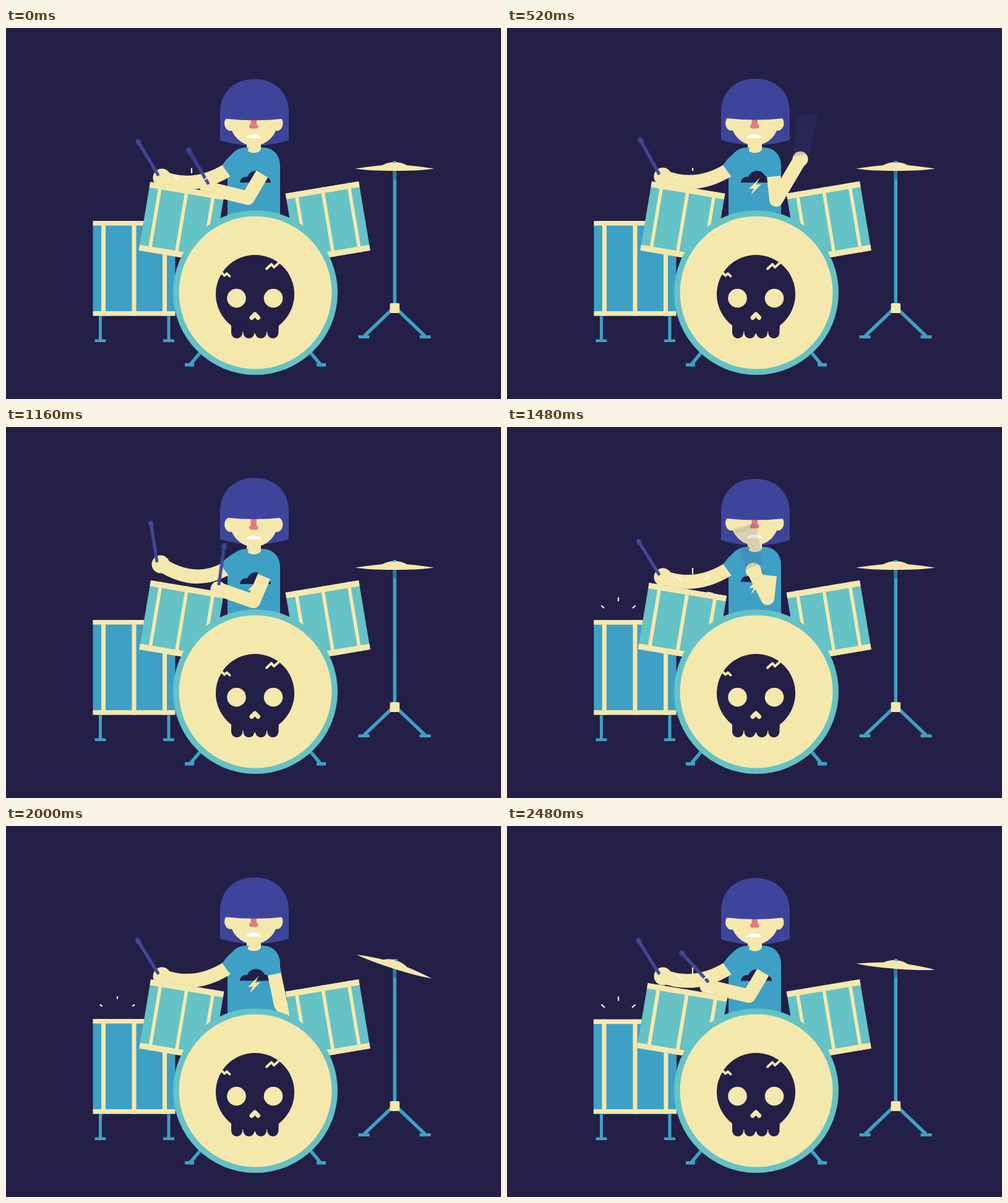
Write an HTML page with a canvas that moves like this. It is 800 px wide and 600 px high and loops after 2.52 s.

```html
<!DOCTYPE html>
<html lang="en">
<head>
<meta charset="utf-8">
<title>Drummer</title>
<style>
html, body { margin: 0; width: 100%; height: 100%; overflow: hidden; background: #231f47; }
canvas { display: block; width: 800px; height: 600px; }
</style>
</head>
<body>
<canvas id="stage" width="800" height="600"></canvas>
<script>
const NIGHT = '#231f47', CREAM = '#f5e8ac', BLUE = '#3ea0c5', TEAL = '#65c2c5';
const INDIGO = '#3d459b', PINK = '#e27a83', SHADE = '#2b7c9f', WHITE = '#ffffff';
const LOOP = 2520, BEAT = 504, FIRST_BEAT = 280;
const SHUTTER = 20, BLUR_STEPS = 8;

const stage = document.getElementById('stage').getContext('2d');
const layer = document.createElement('canvas');
layer.width = 800;
layer.height = 600;
const blur = layer.getContext('2d');
let c = stage;

const mod = (a, n) => ((a % n) + n) % n;
const rad = deg => deg * Math.PI / 180;

// Smooth looping curve through rows of [time, ...values].
function track(rows, time, period) {
  const n = rows.length;
  const row = i => {
    const r = rows[mod(i, n)].slice();
    r[0] += Math.floor(i / n) * period;
    return r;
  };
  const t = mod(time, period);
  let i = n - 1;
  while (i >= 0 && rows[i][0] > t) i--;
  const [a, b, d, e] = [row(i - 1), row(i), row(i + 1), row(i + 2)];
  const h = d[0] - b[0], u = (t - b[0]) / h;
  return b.slice(1).map((v, j) => {
    const k = j + 1, w = d[k];
    const m0 = (w - a[k]) / (d[0] - a[0]) * h;
    const m1 = (e[k] - v) / (e[0] - b[0]) * h;
    return v + u * (m0 + u * (3 * (w - v) - 2 * m0 - m1 + u * (2 * (v - w) + m0 + m1)));
  });
}

function linear(rows, t) {
  for (let i = 1; i < rows.length; i++) {
    const [t0, v0] = rows[i - 1], [t1, v1] = rows[i];
    if (t >= t0 && t < t1) return v0 + (v1 - v0) * (t - t0) / (t1 - t0);
  }
  return 0;
}

// phase, grip x, grip y, stick angle, sleeve x, sleeve y
const LEFT_ARM = [
  [0, 250, 282, -204, 360, 238],
  [8, 248, 278, -199, 359, 238],
  [40, 246, 257, -167, 355, 235],
  [110, 246, 243, -131, 356, 232],
  [184, 246, 239, -122, 356, 231],
  [224, 246, 238, -121, 356, 231],
  [376, 244, 218, -99, 353, 231],
  [420, 244, 216, -106, 353, 232],
  [455, 257, 258, -168, 357, 236],
  [480, 264, 288, -204, 360, 238]
];

// Right arm rows: time, elbow x, elbow y, grip x, grip y, stick angle.
const TOM_STROKE = [
  [-92, 398, 281, 340, 252, -88],
  [-32, 395, 280, 316, 284, -145],
  [0, 393, 280, 312, 288, -172],
  [88, 391, 277, 325, 255, -127]
];
const RIGHT_TOM_TRIP = [
  [520, 435, 278, 475, 205, -80],
  [600, 470, 266, 565, 215, -35],
  [650, 452, 284, 500, 285, 10],
  [700, 438, 290, 430, 318, -60],
  [760, 412, 286, 325, 310, -165]
];
const CYMBAL_TRIP = [
  [1540, 455, 274, 480, 190, -85],
  [1620, 483, 252, 548, 122, -72],
  [1690, 485, 256, 575, 190, -35],
  [1730, 470, 272, 545, 237, 0],
  [1800, 443, 288, 480, 335, 40],
  [2030, 443, 288, 470, 325, 20],
  [2160, 424, 287, 390, 315, -80],
  [2280, 396, 281, 312, 285, -142]
];
const LEFT_TOM_HITS = [312, 824, 1330, 2345];
const RIGHT_TOM_HITS = [640];
const CYMBAL_HITS = [1725];
const KICKS = [[276, 8], [810, 6], [1770, 8]];

const tomStroke = hit => TOM_STROKE.map(([t, ...pose]) => [hit + t, ...pose]);
const [firstHit, secondHit, thirdHit, lastHit] = LEFT_TOM_HITS;
const REST = [391, 275, 327, 252, -120], READY = [400, 282, 344, 255, -82];
const RIGHT_ARM = [
  [0, ...REST],
  ...tomStroke(firstHit),
  ...RIGHT_TOM_TRIP,
  ...tomStroke(secondHit).slice(2),
  [1000, ...REST],
  [1160, ...READY],
  ...tomStroke(thirdHit),
  ...CYMBAL_TRIP,
  ...tomStroke(lastHit).slice(2),
  [2480, 391, 275, 325, 252, -133]
];

const beatPhase = t => mod(t - FIRST_BEAT, BEAT);
const sinceHit = (t, hits) => Math.min(...hits.map(h => mod(t - h, LOOP)));
const squash = d => linear([[0, 0], [8, .38], [45, 1], [133, .62], [175, .08], [195, 0]], d);

function fill(color, build) {
  c.fillStyle = color;
  c.beginPath();
  build();
  c.fill();
}
function rect(color, x, y, w, h) {
  c.fillStyle = color;
  c.fillRect(x, y, w, h);
}
function disc(color, x, y, rx, ry = rx) {
  fill(color, () => c.ellipse(x, y, rx, ry, 0, 0, 7));
}
function poly(points) {
  points.forEach(([x, y], i) => i ? c.lineTo(x, y) : c.moveTo(x, y));
}
function stroke(color, width, points, cap = 'butt') {
  c.strokeStyle = color;
  c.lineWidth = width;
  c.lineCap = cap;
  c.lineJoin = 'round';
  c.beginPath();
  poly(points);
  c.stroke();
}
function at(x, y, draw) {
  c.save();
  c.translate(x, y);
  draw();
  c.restore();
}

function stands() {
  for (const x of [152.5, 263]) {
    rect(BLUE, x - 2.5, 450, 5, 55);
    rect(SHADE, x - 2.5, 450, 5, 17);
    rect(BLUE, x - 9, 503.5, 18, 4.5);
  }
  rect(BLUE, 625.5, 215, 5.5, 235);
  rect(SHADE, 625.5, 228, 5.5, 17);
  for (const side of [-1, 1]) {
    stroke(BLUE, 5.5, [[628 + side * 5, 456], [628 + side * 49, 498]]);
    rect(BLUE, 628 + side * 49.5 - 9, 497, 18, 5);
  }
  fill(CREAM, () => c.roundRect(620.5, 445, 15.5, 16, 2));
}

function torso(lift) {
  at(0, lift, () => {
    fill(BLUE, () => {
      c.moveTo(358, 340);
      c.lineTo(358, 228);
      c.bezierCurveTo(360, 208, 372, 197, 390, 197);
      c.lineTo(412, 197);
      c.bezierCurveTo(433, 197, 443, 210, 443, 228);
      c.lineTo(443, 340);
    });
    c.save();
    c.beginPath();
    c.rect(370, 220, 70, 34);
    c.clip();
    disc(NIGHT, 387.5, 254, 9.5);
    disc(NIGHT, 404, 250, 15);
    disc(NIGHT, 418, 254, 10);
    c.restore();
    fill(CREAM, () => poly([[409, 246], [391, 264], [399, 263.5], [394, 274], [411, 256.5], [402.5, 257]]));
  });
}

function neck(lift) {
  rect(CREAM, 389, 180, 23, 19 + lift);
  disc(CREAM, 400.5, 199 + lift, 11.5, 7);
}

function dome() {
  c.moveTo(346, 181);
  c.lineTo(346, 137);
  c.bezierCurveTo(346, 103, 369, 82, 401.5, 82);
  c.bezierCurveTo(434, 82, 457, 103, 457, 137);
}

function head(phase, lift) {
  const wave = peak => Math.cos((phase - peak) / BEAT * 2 * Math.PI);
  const hairY = 2.6 + 3.5 * wave(50);
  const faceY = 4.5 + 4.7 * wave(10);
  at(0, hairY, () => fill(INDIGO, () => {
    dome();
    c.lineTo(457, 181);
    c.quadraticCurveTo(401.5, 198, 346, 181);
  }));
  neck(lift);
  at(0, faceY, () => {
    disc(CREAM, 363, 154, 10, 12);
    disc(CREAM, 437.5, 154, 10, 12);
    disc(CREAM, 400.5, 149, 39, 41);
    rect(PINK, 395.5, 138, 9.5, 22);
    fill(PINK, () => c.roundRect(393, 155.5, 14.5, 7, 3.5));
    fill(WHITE, () => {
      c.moveTo(388, 178);
      c.bezierCurveTo(389, 170, 411, 170, 412, 178);
      c.closePath();
    });
  });
  at(0, hairY, () => fill(INDIGO, () => {
    dome();
    c.lineTo(457, 146);
    c.lineTo(447, 146);
    c.quadraticCurveTo(401.5, 151, 356, 146);
    c.lineTo(346, 146);
  }));
}

function leftArm([gx, gy, , sx, sy], lift) {
  const hx = gx + 6, hy = gy + 4;
  c.strokeStyle = CREAM;
  c.lineWidth = 22.5;
  c.lineCap = 'butt';
  c.beginPath();
  c.moveTo(sx + 3, sy - 2);
  c.quadraticCurveTo(305, 263 + (hy - 242) * .26, hx, hy);
  c.stroke();
  disc(CREAM, hx, hy, 14.5);
  fill(BLUE, () => {
    c.moveTo(392, 197 + lift);
    c.quadraticCurveTo(366, 200 + lift, sx - 6.5, sy - 9);
    c.lineTo(sx + 6.5, sy + 9);
    c.lineTo(385, 226);
  });
}

function rightArm([ex, ey, gx, gy], lift) {
  const sx = 428, sy = 216 + lift;
  const len = Math.hypot(ex - sx, ey - sy);
  const ux = (ex - sx) / len, uy = (ey - sy) / len;
  const hx = gx - 1, hy = gy + 7;
  stroke(CREAM, 22, [[sx, sy], [ex, ey], [hx, hy]]);
  disc(CREAM, hx, hy, 12.5);
  stroke(BLUE, 23, [[sx, sy], [sx + ux * 28, sy + uy * 28]]);
  disc(BLUE, sx, sy, 11.5);
}

function stick(x, y, angle) {
  at(x, y, () => {
    c.rotate(rad(angle));
    fill(INDIGO, () => {
      c.roundRect(-1, -2.5, 64, 5, 1.5);
      c.ellipse(62, 0, 5.5, 4, 0, 0, 2 * Math.PI);
    });
  });
}

// Averages several moments of an open shutter.
function sticks(t) {
  blur.clearRect(0, 0, 800, 600);
  blur.globalCompositeOperation = 'lighter';
  blur.globalAlpha = 1 / BLUR_STEPS;
  c = blur;
  for (let i = 0; i < BLUR_STEPS; i++) {
    const now = t + SHUTTER * ((i + .5) / BLUR_STEPS - .5);
    const [lx, ly, la] = track(LEFT_ARM, beatPhase(now), BEAT);
    const [, , rx, ry, ra] = track(RIGHT_ARM, now, LOOP);
    stick(lx, ly, la);
    stick(rx, ry, ra);
  }
  c = stage;
  c.drawImage(layer, 0, 0);
}

function spark(x, y, d) {
  if (d > 215) return;
  const inner = 7 + .12 * d;
  const outer = inner + 1.5 + 8 * Math.sin(Math.PI * d / 220);
  for (let i = 0; i < 7; i++) {
    const a = i / 7 * 2 * Math.PI, s = Math.sin(a), k = -Math.cos(a);
    stroke(WHITE, 2.2, [[x + s * inner, y + k * inner], [x + s * outer, y + k * outer]], 'round');
  }
}

function cymbal(t) {
  const d = sinceHit(t, CYMBAL_HITS) - 25;
  let angle = 0;
  if (d > 0 && d < 770) {
    const fade = Math.min(1, d / 25, (770 - d) / 80);
    angle = -29 * fade * Math.exp(-d * .00143) * Math.cos((d - 50) / 480 * 2 * Math.PI);
  }
  at(628, 226, () => {
    c.rotate(rad(angle));
    fill(CREAM, () => {
      c.moveTo(-64, 1.5);
      c.quadraticCurveTo(-40, -2.5, -20, -4);
      c.quadraticCurveTo(-11, -9, 0, -9);
      c.quadraticCurveTo(11, -9, 20, -4);
      c.quadraticCurveTo(40, -2.5, 64, 1.5);
      c.quadraticCurveTo(40, 5, 0, 5);
      c.quadraticCurveTo(-40, 5, -64, 1.5);
    });
    rect(BLUE, -2.5, -11, 5, 3);
  });
}

// The origin is the middle of the drum's bottom edge.
function drum(color, w, h, band, stripe, gap) {
  rect(color, -w / 2, -h, w, h);
  for (const i of [-1, 0, 1]) rect(CREAM, i * gap - stripe / 2, -h, stripe, h);
  rect(CREAM, -w / 2, -h, w, band);
  rect(CREAM, -w / 2, -band, w, band);
}

function floorTom(phase) {
  const s = .215 * squash(phase);
  at(207, 465.5 - 90 * s * s, () => {
    c.scale(1 + s, 1 - .5 * s);
    drum(BLUE, 133, 153.5, 7.5, 7, 49.5);
  });
}

function tom(x, tilt, d) {
  const s = .15 * squash(d);
  at(x, 313.8, () => {
    c.rotate(rad(tilt));
    c.translate(0, 56.7);
    c.scale(1 + s, 1 - .7 * s);
    drum(TEAL, 120, 113.5, 9.5, 5.5, 43);
  });
}

function bass(t) {
  for (const side of [-1, 1]) {
    stroke(BLUE, 5.5, [[403 + side * 84, 519], [403 + side * 105, 544]]);
    rect(BLUE, 403 + side * 106.5 - 7.5, 542, 15, 5.5);
  }
  let grow = 0;
  for (const [time, amount] of KICKS) {
    grow += amount * linear([[-45, 0], [0, 1], [80, 0]], t - time);
  }
  at(403, 428, () => {
    const s = 1 + grow / 133;
    c.scale(s, s);
    disc(TEAL, 0, 0, 133);
    disc(CREAM, 0, 0, 123.5);
    c.translate(-403, -428);
    skull();
  });
}

function skull() {
  disc(NIGHT, 402.5, 430.5, 63.5);
  rect(NIGHT, 364, 465, 76.5, 22);
  for (let i = 0; i < 4; i++) fill(NIGHT, () => c.roundRect(364 + i * 19.4, 470, 18.2, 32, 9));
  disc(CREAM, 372.5, 437, 15.3);
  disc(CREAM, 432, 437, 15.3);
  stroke(CREAM, 7, [[397, 468.5], [402.3, 463], [407.5, 468.5]], 'round');
  stroke(CREAM, 3.8, [[421, 389.5], [429, 382], [433, 387], [444, 377]], 'round');
  stroke(CREAM, 3.8, [[344, 399], [349, 396], [353, 400.5], [357, 397], [361.5, 401.5]], 'round');
}

function draw(t) {
  const phase = beatPhase(t);
  const lift = -4 * linear([[70, 0], [110, .4], [184, .85], [220, 1], [260, .95], [350, 0]], phase);
  const leftTomHit = sinceHit(t, LEFT_TOM_HITS);
  const rightTomHit = sinceHit(t, RIGHT_TOM_HITS);

  rect(NIGHT, 0, 0, 800, 600);
  stands();
  torso(lift);
  head(phase, lift);
  leftArm(track(LEFT_ARM, phase, BEAT), lift);
  rightArm(track(RIGHT_ARM, t, LOOP), lift);
  sticks(t);
  spark(180, 311, phase);
  spark(300, 262, leftTomHit);
  spark(504, 262, rightTomHit);
  spark(600, 220, sinceHit(t, CYMBAL_HITS));
  cymbal(t);
  floorTom(phase);
  tom(283.8, 9.5, leftTomHit);
  tom(520.2, -9.5, rightTomHit);
  bass(t);
}

const start = performance.now();
function frame() {
  const elapsed = (performance.now() - start) % LOOP;
  draw(Math.floor(elapsed / 40) * 40);
  requestAnimationFrame(frame);
}
frame();
</script>
</body>
</html>
```
